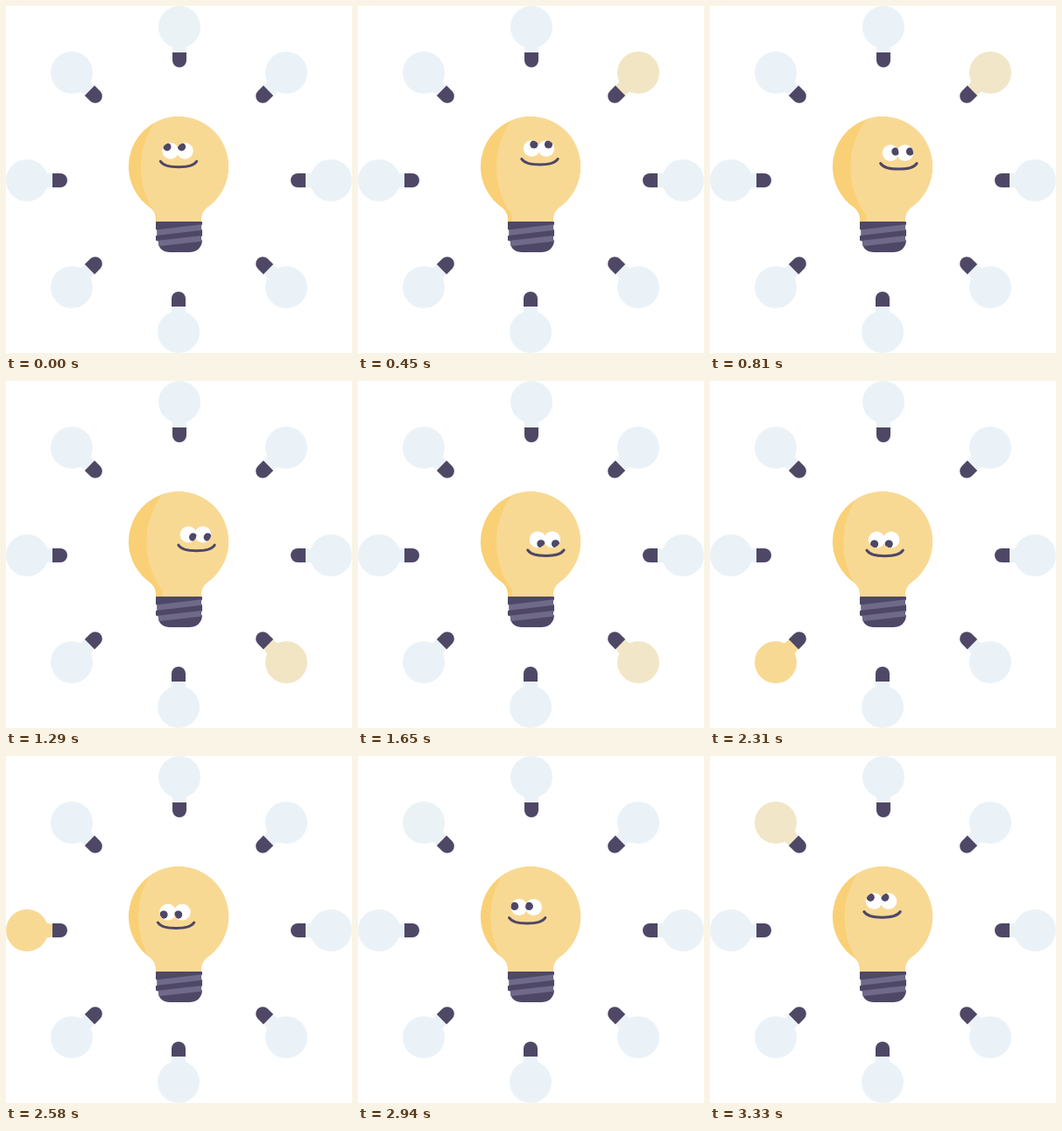
Animation of 395 by 396 pixels, one loop 3.36 s. Source, as an HTML page:

```html
<!DOCTYPE html>
<html lang="en">
<head>
<meta charset="utf-8">
<title>Light bulbs</title>
<style>
  html, body { margin: 0; width: 100%; height: 100%; overflow: hidden; background: #fff; }
  svg { display: block; }
  .dark { fill: #4e4766; }
  .light { fill: #f8d994; }
  .shade { fill: #f9d075; }
</style>
</head>
<body>
<svg width="395" height="396" viewBox="0 0 395 396">
  <defs>
    <path id="glass" d="M171 247V243C171 238 169 234 164.500 230A57 57 0 1 1 229.500 230C225 234 223 238 223 243V247Z"/>
    <path id="screw" d="M171 247q0-1 1-1h51q1 0 1 1v2l-1 1.500v4l1 1.500v6l-1 1.500v3l1 1.500C223 277 217 281 209 281H187C180 281 175 277 174 271.500V268.500L171 267.500V262.500L172.500 261.500V256L171 254.500Z"/>
    <clipPath id="inGlass"><use href="#glass"/></clipPath>
    <clipPath id="inScrew"><use href="#screw"/></clipPath>
    <clipPath id="inEye"><circle r="9.400"/></clipPath>
    <g id="smallGlass"><circle r="24"/><path d="M-9 20Q-7.500 25-7.500 29.500H7.500Q7.500 25 9 20Z"/></g>
    <path id="smallBase" d="M-8 29H8V38A8 8 0 0 1-8 38Z"/>
  </defs>

  <g id="ring"></g>

  <use href="#glass" class="shade"/>
  <g clip-path="url(#inGlass)">
    <path id="lit" class="light" d="M24 122A92 92 0 0 0 18 239V250H130V122Z"/>
  </g>
  <use href="#screw" class="dark"/>
  <path clip-path="url(#inScrew)" d="M168 259L228 252M168 271.700L228 264.700" stroke="#706a8a" stroke-width="6.500"/>

  <g id="face">
    <circle cx="-9.300" r="9.400" fill="#fff"/>
    <circle cx="7.300" r="9.400" fill="#fff"/>
    <g transform="translate(-9.300)" clip-path="url(#inEye)"><circle class="pupil dark" r="4.600"/></g>
    <g transform="translate(7.300)" clip-path="url(#inEye)"><circle class="pupil dark" r="4.600"/></g>
    <path d="M-20.700 12C-15 20.700 15 20.700 20.700 12" fill="none" stroke="#4e4766" stroke-width="3" stroke-linecap="round"/>
  </g>
</svg>
<script>
const LOOP = 3360, STEP = LOOP / 8, FADE = 60;
const OFF = [234, 242, 248], ON = [248, 217, 148];

// Small bulbs in lighting order: centre and rotation of the base
const bulbs = [
  [198, 24, 0], [320, 76, 45], [371, 199, 90], [320, 321, 135],
  [197, 372, 180], [75, 321, 225], [24, 199, 270], [75, 76, 315]
];

// One pose per step: face x, face y, pupil x, pupil y
const poses = [
  [197, 165.3, -3.8, -4.5], [206.8, 162.4, 2.3, -4.8],
  [215.8, 168, 5.9, -1.2], [217.6, 174.7, 5.5, 2.8],
  [214, 181.2, 3.6, 5], [205.4, 182.6, -0.6, 5.4],
  [194.8, 178.8, -4.4, 3.6], [193.2, 172.5, -5.2, -1]
];

const $ = id => document.getElementById(id);
const move = (el, x, y) => el.setAttribute("transform", `translate(${x} ${y})`);

$("ring").innerHTML = bulbs.map(([x, y, angle]) =>
  `<g transform="translate(${x} ${y}) rotate(${angle})">
    <use href="#smallGlass" class="glow"/><use href="#smallBase" class="dark"/>
  </g>`).join("");
const glows = document.querySelectorAll(".glow");
const pupils = document.querySelectorAll(".pupil");

// Closed Catmull-Rom curve through the poses
function poseAt(t) {
  const i = Math.floor(t / STEP), u = t / STEP - i;
  const [a, b, c, d] = [7, 0, 1, 2].map(k => poses[(i + k) % 8]);
  return b.map((v, n) => v + u / 2 * (c[n] - a[n] +
    u * (2 * a[n] - 5 * v + 4 * c[n] - d[n] + u * (3 * (v - c[n]) + d[n] - a[n]))));
}

function draw(t) {
  glows.forEach((glow, i) => {
    const local = t - i * STEP;
    const level = Math.max(0, Math.min(1, local / FADE, (STEP - local) / FADE));
    glow.style.fill = `rgb(${OFF.map((v, n) => Math.round(v + (ON[n] - v) * level))})`;
  });
  const [x, y, px, py] = poseAt(t);
  move($("face"), x, y);
  pupils.forEach(pupil => move(pupil, px, py));
  move($("lit"), 156 + 5 * Math.sin(2 * Math.PI * (t - STEP / 2) / LOOP), 0);
}

const start = performance.now();
function tick() {
  draw((performance.now() - start) % LOOP);
  requestAnimationFrame(tick);
}
tick();
</script>
</body>
</html>
```
